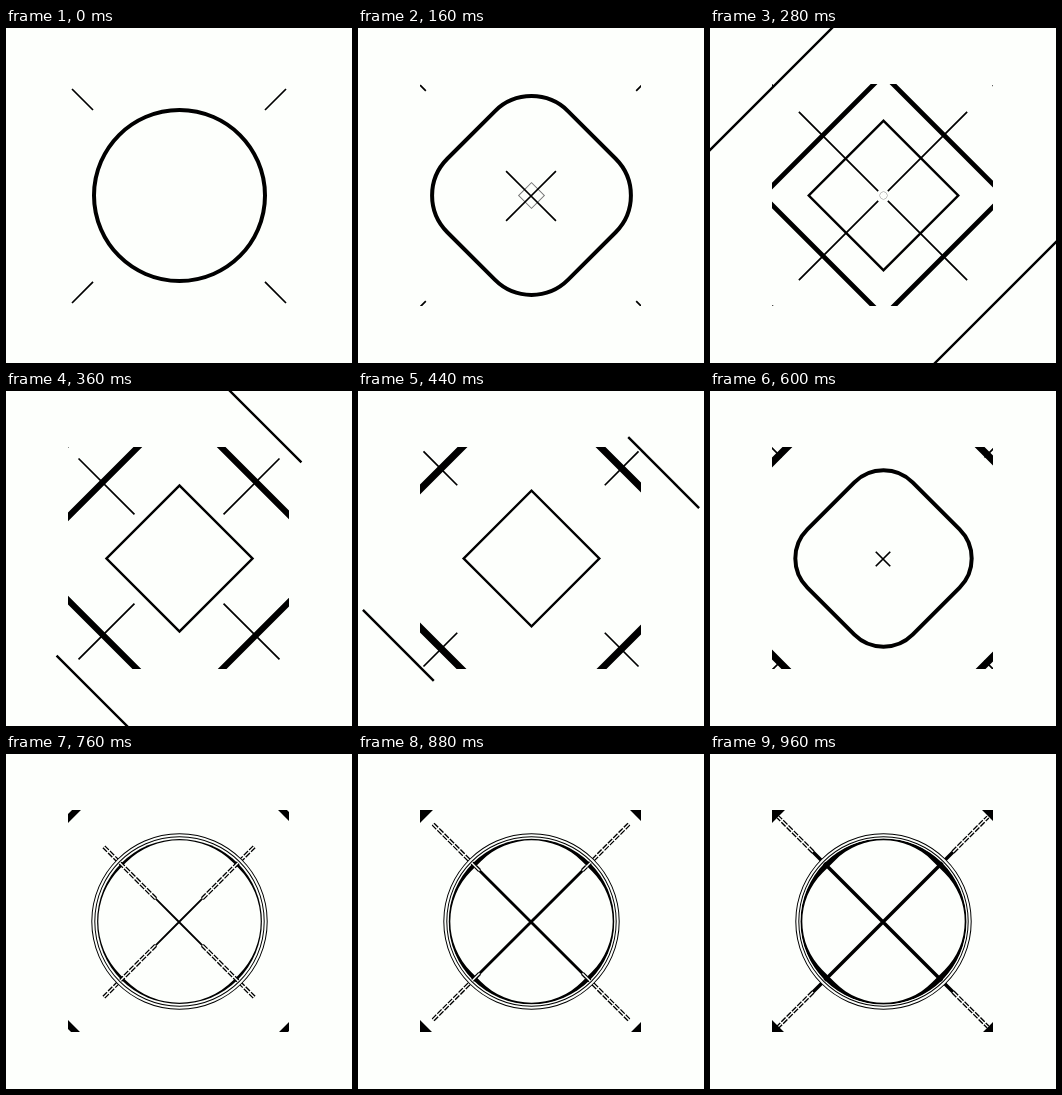
Recreate the animation shown at these times as an HTML page with a canvas. Size 346 by 335 pixels, loop 1000 ms.

```html
<!DOCTYPE html>
<html lang="en">
<head>
<meta charset="utf-8">
<title>Circle and diamond loop</title>
<style>
html, body { margin: 0; width: 100%; height: 100%; overflow: hidden; background: #fdfffc; }
canvas { display: block; }
</style>
</head>
<body>
<canvas width="346" height="335"></canvas>
<script>
const ctx = document.querySelector('canvas').getContext('2d');
const PAPER = '#fdfffc', INK = '#000', SQ2 = Math.SQRT2;
const R = 85.5;            // ring radius
const TRACK = 219 / SQ2;   // half side of the runners' diamond
const NUDGE = 0.7;         // rays sit slightly below the ring's centre

// 0 to 1, fast at first and settling slowly
function settle(t, start, tau, power = 1) {
  return 1 - Math.exp(-((Math.max(0, t - start) / tau) ** power));
}

function smooth(t, from, to) {
  const x = Math.min(1, Math.max(0, (t - from) / (to - from)));
  return x * x * (3 - 2 * x);
}

function stroke(width, color = INK) {
  ctx.lineWidth = width;
  ctx.strokeStyle = color;
  ctx.stroke();
}

function fill(color) {
  ctx.fillStyle = color;
  ctx.fill();
}

function box(half, radius = 0) {
  ctx.beginPath();
  ctx.roundRect(-half, -half, 2 * half, 2 * half, Math.max(0, Math.min(half, radius)));
}

function disc(r) {
  ctx.beginPath();
  ctx.arc(0, 0, r, 0, 2 * Math.PI);
}

// Four rays; from and to are horizontal distances from the centre
function rays(from, to, width, color, dash = []) {
  if (to <= from) return;
  const a = from * SQ2, b = to * SQ2;
  ctx.beginPath();
  for (const [x, y] of [[1, 0], [0, 1], [-1, 0], [0, -1]]) {
    ctx.moveTo(x * a, y * a + NUDGE);
    ctx.lineTo(x * b, y * b + NUDGE);
  }
  ctx.setLineDash(dash);
  stroke(width, color);
  ctx.setLineDash([]);
}

const reach = (t, start, tau = 162) => 112 * settle(t, start, tau, 1.2);

// Two strokes running clockwise along a large diamond
function runners(t) {
  const along = start => 2 * TRACK * 2 * settle(t, start, 125);
  const tail = along(280), head = along(171);
  if (head <= tail || t > 600) return;
  ctx.setLineDash([head - tail, 9999]);
  ctx.lineDashOffset = -tail;
  for (const s of [TRACK, -TRACK]) {
    ctx.beginPath();
    ctx.moveTo(-s, s);
    ctx.lineTo(-s, -s);
    ctx.lineTo(s, -s);
    stroke(2.4);
  }
}

function morph(t) {
  box(R + 69 * settle(t, 283, 165, 1.2), R * (1 - (t / 280) ** 1.67));
  stroke(4 + 3 * smooth(t, 200, 440));

  if (t > 147) {
    const half = 56 * settle(t, 147, 55, 1.2) - 8 * smooth(t, 280, 440) + 37.5 * smooth(t, 440, 690);
    box(half, R * smooth(t, 480, 726));
    stroke(1 + 1.4 * smooth(t, 160, 240) + 1.6 * smooth(t, 440, 600), t < 200 ? '#777' : INK);
  }

  rays(reach(t, 268), reach(t, 122, 120), 1.7);
  for (const s of [t, t + 1000]) rays(reach(s, 778), reach(s, 583), 1.7);

  if (t > 240 && t < 320) {
    disc(3.8);
    fill(PAPER);
    stroke(0.7, '#aaa');
  }
}

// Hollow ring with dark crescents and outlined rays
function hollow(t) {
  const p = (t - 720) / 240;
  const half = 80 - 2.5 * p, tip = 81.2;
  disc(82.3 + 0.7 * p);
  fill(INK);
  box(half, (half * SQ2 - tip) / (SQ2 - 1));
  fill(PAPER);

  const solid = 14 + 56 * p, end = reach(t, 583);
  rays(solid, end, 4, INK, [6, 1.5]);
  rays(solid, end, 1.4, PAPER);
  rays(0, solid, 1.5 + 2 * p);

  disc(R);
  stroke(4.4, PAPER);
  for (const r of [87.7, 84.7]) {
    disc(r);
    stroke(1);
  }

  box(151 + 4 * p);
  stroke(5 + 8 * p);
}

function scene(x, y, paint, t, clipped) {
  ctx.save();
  if (clipped) {
    ctx.beginPath();
    ctx.rect(62, 56, 221, 222);
    ctx.clip();
  }
  ctx.translate(x, y);
  ctx.rotate(Math.PI / 4);
  paint(t);
  ctx.restore();
}

function draw(now) {
  const t = Math.floor(now % 1000 / 40) * 40;
  ctx.fillStyle = PAPER;
  ctx.fillRect(0, 0, 346, 335);
  scene(173, 168, runners, t, false);
  scene(173.5, 167.5, t < 720 ? morph : hollow, t, true);
}

const start = performance.now();
function loop() {
  draw(performance.now() - start);
  requestAnimationFrame(loop);
}
loop();
</script>
</body>
</html>
```
